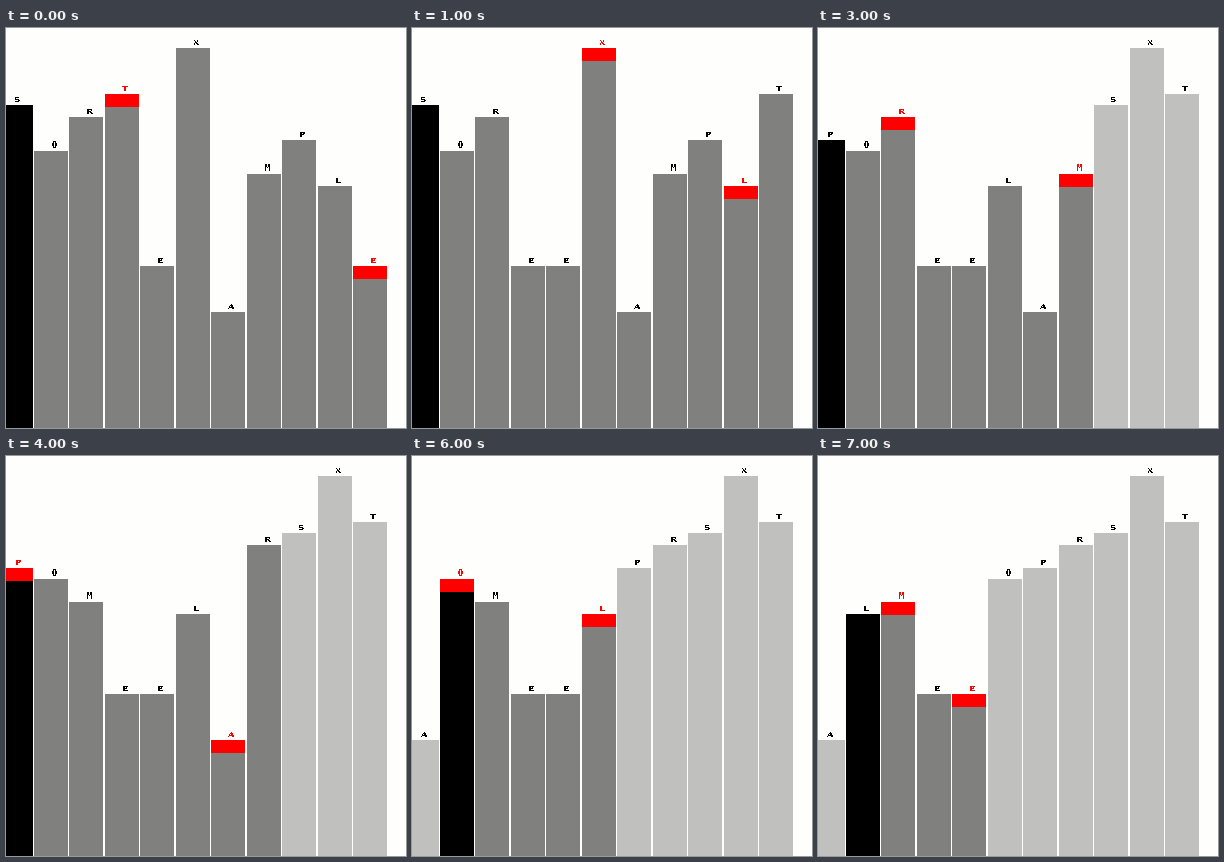
A matplotlib script for the animation above (8000 ms loop, 400 by 400 pixels).

```python
from itertools import islice

import matplotlib.pyplot as plt
from matplotlib.animation import FuncAnimation
from matplotlib.patches import Rectangle

SIZE, DPI = 400, 100
STEP, BAR, CAP, UNIT = 35.5, 34, 13, 11.5
PAPER, WAITING, DONE = "#fefefc", "#80807e", "#c0c0be"
PIVOT, MARK = "#000000", "#fe0000"

plt.rcParams["text.antialiased"] = False


def quicksort(a, lo, hi):
    """Yield (letters, lo, hi, marked pair) just before each exchange."""
    if lo >= hi:
        return
    i, j = lo, hi + 1
    while True:
        i += 1
        while i < hi and a[i] < a[lo]:
            i += 1
        j -= 1
        while a[j] > a[lo]:
            j -= 1
        if i >= j:
            break
        yield a[:], lo, hi, (i, j)
        a[i], a[j] = a[j], a[i]
    yield a[:], lo, hi, (lo, j)
    a[lo], a[j] = a[j], a[lo]
    yield from quicksort(a, lo, j - 1)
    yield from quicksort(a, j + 1, hi)


word = list("SORTEXAMPLE")
states = list(islice(quicksort(word, 0, len(word) - 1), 8))

fig = plt.figure(figsize=(SIZE / DPI, SIZE / DPI), dpi=DPI, facecolor=PAPER)
ax = fig.add_axes([0, 0, 1, 1])


def block(x, top, bottom, color):
    ax.add_patch(Rectangle((x, top), BAR, bottom - top, facecolor=color,
                           linewidth=0, antialiased=False))


def label(x, y, letter, color):
    # the wide round and double letters sit in a narrow cell
    family = "DejaVu Sans Mono" if letter in "MO" else "DejaVu Serif"
    ax.text(x, y, letter, color=color, family=family, weight="bold",
            size=8.5 * 72 / DPI, ha="center", va="baseline")


def draw(frame):
    ax.clear()
    ax.set(xlim=(0, SIZE), ylim=(SIZE, 0))
    ax.axis("off")
    letters, lo, hi, marks = states[frame]
    for i, letter in enumerate(letters):
        x = int(STEP * i - 7.5)
        top = int(284.5 - UNIT * (ord(letter) - ord("A")))
        color = PIVOT if i == lo else WAITING if lo < i <= hi else DONE
        block(x, top, SIZE, color)
        if i in marks:
            block(x, top, top + CAP, MARK)
        label(int(STEP * i + 12.5), top - 3, letter,
              MARK if i in marks else "black")


anim = FuncAnimation(fig, draw, frames=len(states), interval=1000,
                     init_func=lambda: None, repeat=True, repeat_delay=0)
plt.show()
```
